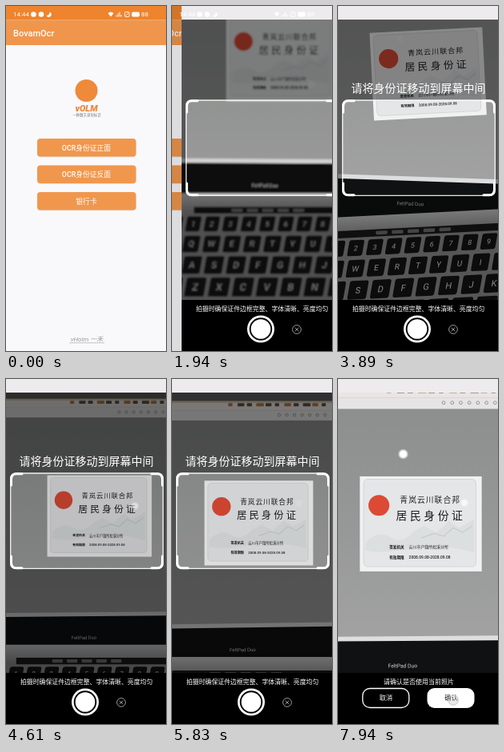
Write an HTML page that moves like this. It is 200x432 px and loops after 8 s.

```html
<!DOCTYPE html>
<html lang="zh-CN">
<head>
<meta charset="utf-8">
<title>证件扫描</title>
<style>
html, body { margin: 0; width: 100%; height: 100%; overflow: hidden; background: #000; }
svg { display: block; width: 100vw; height: 100vh; }
text { font-family: Roboto, "Noto Sans CJK SC", "Noto Sans CJK", sans-serif; }
</style>
</head>
<body>
<svg id="stage" viewBox="0 0 200 432">
  <defs>
    <clipPath id="page"><rect width="200" height="432"/></clipPath>
    <filter id="soft" filterUnits="userSpaceOnUse" x="-20" y="-20" width="240" height="472">
      <feGaussianBlur id="blur" stdDeviation="0"/>
    </filter>
    <radialGradient id="shine">
      <stop offset=".55" stop-color="#fff"/><stop offset="1" stop-color="#fff" stop-opacity="0"/>
    </radialGradient>
    <linearGradient id="glass" x2="0" y2="1">
      <stop stop-color="#8b8d8c"/><stop offset=".45" stop-color="#959796"/><stop offset="1" stop-color="#a3a4a3"/>
    </linearGradient>
    <linearGradient id="metal" x2="0" y2="1">
      <stop stop-color="#d4d4d4"/><stop offset=".09" stop-color="#969696"/><stop offset="1" stop-color="#969696"/>
    </linearGradient>
  </defs>

  <g id="home">
    <rect width="200" height="432" fill="#f9f8fb"/>
    <rect width="200" height="17.5" fill="#ee842d"/>
    <rect y="17.5" width="200" height="31.5" fill="#f0964c"/>
    <circle cx="100.500" cy="106" r="14" fill="#ee8a3a"/>
  </g>
  <rect id="shade" width="200" height="432" opacity="0"/>

  <g id="camera" clip-path="url(#page)">
    <rect width="200" height="432"/>
    <g id="feed">
      <g id="scene">
        <rect x="-300" y="-300" width="600" height="182" fill="#5e5e5e"/>
        <rect x="-300" y="-118" width="600" height="290" fill="url(#glass)"/>
        <g id="tools"></g>
        <g id="lid"></g>
        <g id="keys"></g>
        <g id="card"></g>
      </g>
      <rect id="dark" width="200" height="432" opacity="0"/>
    </g>
    <circle id="glare" r="5.500" fill="url(#shine)"/>
    <circle id="lamp" cx="81.500" cy="94" r="6.800" fill="url(#shine)"/>
    <g id="scan">
      <path fill-rule="evenodd" opacity=".43" d="M0 17H200V369H0ZM13 118H189Q197 118 197 126V230Q197 238 189 238H13Q5 238 5 230V126Q5 118 13 118Z"/>
      <rect x="5.700" y="118" width="190.600" height="119.300" rx="7" fill="none" stroke="#fff" stroke-width="1.300" opacity=".9"/>
      <path fill="none" stroke="#fff" stroke-width="3" stroke-linecap="round" d="M6.500 133V125.500Q6.500 118.700 13 118.700H20M182 118.700H189Q195.500 118.700 195.500 125.500V133M195.500 222V230Q195.500 236.800 189 236.800H182M20 236.800H13Q6.500 236.800 6.500 230V222"/>
    </g>
    <rect y="368" width="200" height="64"/>
    <g id="shoot">
      <circle cx="99" cy="404.500" r="17" fill="#fff"/>
      <circle cx="99" cy="404.500" r="13.300" fill="#fff" stroke="#000" stroke-width="1.900"/>
      <g fill="none" stroke="#bbb" stroke-width=".8">
        <circle cx="144" cy="405" r="5.400"/>
        <path d="M141.700 402.700l4.600 4.600m0-4.600l-4.600 4.600"/>
      </g>
    </g>
    <g id="confirm">
      <rect x="30.800" y="387.500" width="58" height="24" rx="9" stroke="#fff" stroke-width="1.300"/>
      <rect x="111.500" y="387" width="59" height="25" rx="9" fill="#fff"/>
    </g>
    <circle id="touch" cx="144" cy="402" r="6.300" fill="#bbb" fill-opacity=".3" stroke="#bbb" stroke-width=".9"/>
    <rect width="200" height="17" fill="#edebee"/>
  </g>

  <g id="status" fill="#fff">
    <circle cx="34.500" cy="10.500" r="3.300"/>
    <circle cx="44" cy="10.500" r="3.300"/>
    <path d="M54.500 7.500A3.300 3.300 0 1 1 50.500 12A4 4 0 0 0 54.500 7.500Z"/>
    <path d="M127.500 9Q131 6 134.500 9L131 13.500Z"/>
    <path d="M137.500 13.500v-2h1v2zm2 0v-4h1v4zm2 0v-6h1v6zm2 0v-2.500h1v2.500z"/>
    <rect x="148.500" y="7.500" width="5.500" height="6" rx="1" fill="none" stroke="#fff" stroke-width=".9"/>
    <path d="M149.500 12.500l3.500-4" stroke="#fff" stroke-width=".8"/>
    <rect x="157" y="7.500" width="10" height="6" rx="2"/>
  </g>
</svg>
<script>
const $ = id => document.getElementById(id);
const LOOP = 8000, OPEN = 1670, SLIDE = 445, HINT = 2890, CAPTURE = 6880, TAP = 7940;

function add(parent, tag, attrs) {
  const el = document.createElementNS("http://www.w3.org/2000/svg", tag);
  for (const k in attrs) el.setAttribute(k, attrs[k]);
  $(parent).appendChild(el);
  return el;
}
const box = (p, x, y, width, height, fill, more) => add(p, "rect", { x, y, width, height, fill, ...more });

// y is the visual middle of the line
function label(p, str, x, y, size, fill, more) {
  const el = add(p, "text", { x, y: y + size * 0.37, "font-size": size, fill, ...more });
  el.textContent = str;
  return el;
}
const mid = { "text-anchor": "middle" };
const midBold = { ...mid, "font-weight": 500 };

function buildHome() {
  label("home", "BovamOcr", 9, 34, 11, "#fff", { "font-weight": 500 });
  label("home", "vOLM", 100.5, 128, 11, "#ee8433", { ...mid, "font-weight": 900, "font-style": "italic" });
  label("home", "一种数字身份标识", 101, 136.5, 4.4, "#777", mid);
  ["OCR身份证正面", "OCR身份证反面", "银行卡"].forEach((s, i) => {
    const y = 166 + i * 33.5;
    box("home", 39, y + 0.8, 123.5, 22.5, "#c9b8ab", { rx: 4, opacity: 0.5 });
    box("home", 39, y, 123.5, 22.5, "#f0974d", { rx: 4 });
    label("home", s, 100.5, y + 11.5, 8.8, "#fff", midBold);
  });
  label("home", "vHolm 一禾", 101, 417, 8, "#999", { ...mid, "font-style": "italic" });
  box("home", 79, 421.5, 44, 0.7, "#aaa");
  label("status", "14:44", 9, 10.5, 8, "#fff");
  label("status", "88", 169, 10.5, 8, "#fff");
}

function buildTools() {
  box("tools", -300, -118, 600, 2, "#d9c39a");
  box("tools", -300, -116, 600, 9, "#e8e5e2");
  box("tools", -300, -107, 600, 12, "#e6e4e4");
  for (let i = 0; i < 11; i++)
    box("tools", -44 + i * 11, -115.5, 5 + (i * 3) % 5, 3.8, i % 3 ? "#5c5148" : "#b07a45", { rx: 1 });
  for (let i = 0; i < 7; i++)
    add("tools", "circle", { cx: 16 + i * 9, cy: -101.5, r: 1.6, fill: "none", stroke: "#777", "stroke-width": 0.6 });
}

function buildLaptop() {
  box("lid", -300, 144, 600, 5.5, "#e9e9e9", { opacity: 0.85 });
  box("lid", -300, 149, 600, 50, "#101112");
  label("lid", "FeltPad Duo", -27, 175, 5.7, "#d6d6d6", mid);
  box("keys", -300, 184, 600, 250, "url(#metal)");
  box("keys", -110, 200, 190, 8, "#1b1b1b", { rx: 1 });
  for (let i = 0; i < 5; i++) box("keys", -66 + i * 18, 202, 13, 4, "#777", { rx: 1 });
  add("keys", "g", { id: "caps", transform: "translate(0 200) skewX(-10) translate(0 -200)" });
  ["1234567890-=", "QWERTYUIOP[]", "ASDFGHJKL;'", "ZXCVBNM,./"].forEach((row, r) => {
    const pitch = 21.6 + r * 2.1, y = 211 + r * 22 + r * r * 0.6, h = 18 + r * 1.6;
    [..."  " + row].forEach((ch, i) => {
      const cx = -107 + r * r * 1.7 + (i - 2) * pitch, w = pitch - 4.5;
      box("caps", cx - w / 2, y, w, h, "#151515", { rx: 2.5 });
      label("caps", ch, cx, y + h / 2, 8 + r, "#eee", mid);
    });
  });
}

function buildCard() {
  box("card", -72, -24, 128, 100, "#f1f1f2");
  box("card", -68, -21, 118, 92, "#e5e6e8", { rx: 4, stroke: "#cfd0d3", "stroke-width": 0.7 });
  add("card", "path", { d: "M-66 45Q-52 32-40 40T-16 34L-4 28L8 35L22 23L32 30L48 21V56Q10 46-20 52T-66 54Z", fill: "#d8dadc", opacity: 0.6 });
  add("card", "path", { d: "M-8 41L6 36L16 39L26 30L36 35L46 28", fill: "none", stroke: "#c8cacd", "stroke-width": 1 });
  add("card", "circle", { cx: -52, cy: 6.5, r: 11, fill: "#dc4a35" });
  label("card", "青岚云川联合邦", -30, 1, 8.2, "#222", { "letter-spacing": 0.9, "font-weight": 500 });
  label("card", "居民身份证", -34, 17, 11.6, "#1c1c1c", { "letter-spacing": 3, "font-weight": 500 });
  [["签发机关", "云川市户籍所松溪分所", 50], ["有效期限", "2008.09.08-2028.09.08", 61]].forEach(([k, v, y]) => {
    label("card", k, -41, y, 3.9, "#111", { "font-weight": 700 });
    label("card", v, -20.5, y, 4.15, "#222", { "font-weight": 500 });
  });
}

function buildControls() {
  label("scan", "请将身份证移动到屏幕中间", 100.5, 102.5, 14, "#fff", { ...mid, id: "hint" });
  label("shoot", "拍摄时确保证件边框完整、字体清晰、亮度均匀", 18, 379, 7.88, "#fff");
  label("confirm", "请确认是否使用当前照片", 101, 379.5, 8, "#fff", mid);
  label("confirm", "取消", 60, 399, 8.2, "#fff", mid);
  label("confirm", "确认", 141.5, 399, 8.2, "#222", mid);
}

// time, x, y, scale, lid tilt, wobble, blur, darkness, glare x, glare y, glare opacity
const path = [
  [1940, 133, 37.5, 1.07, 0.3, 0, 0.95, 0.06, 162, 98, 0.2],
  [2890, 133, 37.5, 1.07, 0.3, 0, 0.95, 0.06, 162, 98, 0.2],
  [3890, 120, 56, 1.1, 2, -2.9, 0.7, 0, 78, 41, 0.2],
  [4610, 125, 145, 1.02, -0.5, 0, 0.35, 0.17, 161, 159, 0.5],
  [5280, 122, 156, 1, -0.6, 0, 0, 0.1, 160, 157, 0.1],
  [6440, 113, 149, 1.16, -1, 0, 0.1, 0.06, 158, 155, 0.2],
  [6880, 113, 150.5, 1.19, -0.4, 0, 0, 0, 158, 155, 0.7]
];

// smooth curve through the rows, at rest at both ends
function pose(t) {
  const last = path.length - 1;
  if (t <= path[0][0]) return path[0];
  if (t >= path[last][0]) return path[last];
  let i = 0;
  while (t >= path[i + 1][0]) i++;
  const a = path[i], b = path[i + 1], span = b[0] - a[0], u = (t - a[0]) / span;
  const slope = (j, c) => {
    if (j < 1 || j >= last) return 0;
    const [p, q, r] = [path[j - 1], path[j], path[j + 1]];
    const before = (q[c] - p[c]) / (q[0] - p[0]), after = (r[c] - q[c]) / (r[0] - q[0]);
    return before * after > 0 ? 2 * before * after / (before + after) : 0;
  };
  return a.map((v, c) => {
    const m = slope(i, c) * span, n = slope(i + 1, c) * span, w = u * u * (3 - 2 * u);
    return v + (b[c] - v) * w + m * u * (1 - u) ** 2 - n * u * u * (1 - u);
  });
}

const set = (id, k, v) => $(id).setAttribute(k, v);
const show = (id, on) => set(id, "visibility", on ? "visible" : "hidden");

function draw(t) {
  const u = Math.min(1, Math.max(0, (t - OPEN) / SLIDE));
  const p = 1 - (1 - u) ** 3;
  const shot = t >= CAPTURE;
  set("home", "transform", `translate(${-51 * p})`);
  set("shade", "opacity", 0.12 * p);
  set("camera", "transform", `translate(${200 * (1 - p)})`);
  set("status", "opacity", u < 1 ? 1 : 0);

  const [, x, y, s, tilt, wobble, blur, dark, gx, gy, glow] = pose(t);
  set("scene", "transform", `translate(${x} ${y}) scale(${s})`);
  set("lid", "transform", `skewY(${tilt})`);
  set("keys", "transform", `skewY(${wobble})`);
  set("card", "transform", `skewY(${wobble}) skewX(${-wobble})`);
  if (blur > 0.04) {
    set("blur", "stdDeviation", blur);
    set("feed", "filter", "url(#soft)");
  } else $("feed").removeAttribute("filter");
  set("dark", "opacity", dark);
  set("glare", "cx", gx);
  set("glare", "cy", gy);
  set("glare", "opacity", glow);

  show("scan", !shot);
  show("shoot", !shot);
  show("hint", !shot && t >= HINT);
  show("lamp", shot);
  show("confirm", shot);
  show("touch", t >= TAP);
}

function frame() {
  draw(performance.now() % LOOP);
  requestAnimationFrame(frame);
}

buildHome();
buildTools();
buildLaptop();
buildCard();
buildControls();
frame();
</script>
</body>
</html>
```
